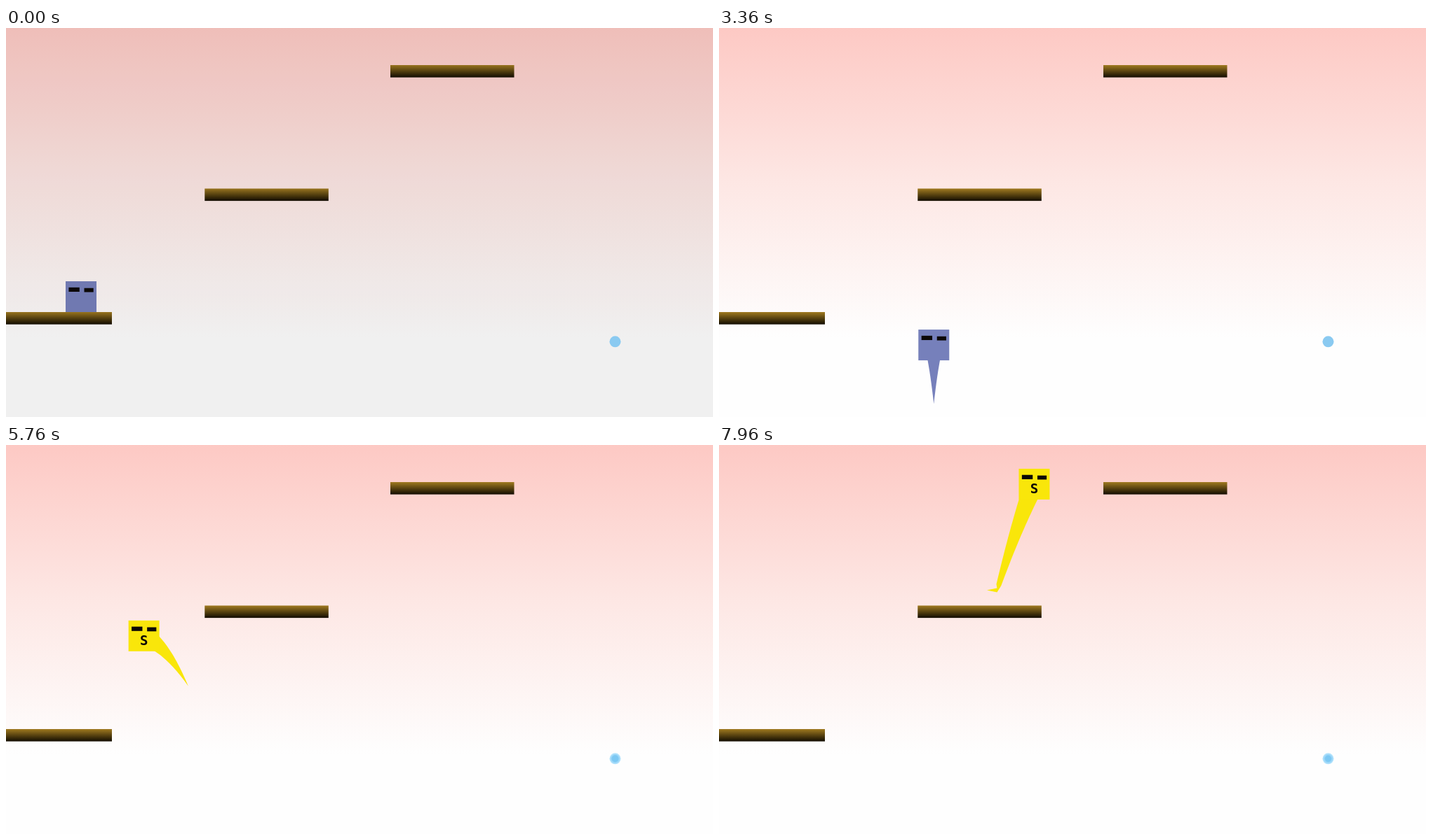
Animation, 1008 px wide and 556 px high, one loop 8 s. Source, as an HTML page with a canvas:

```html
<!DOCTYPE html>
<html lang="en">
<head>
<meta charset="utf-8">
<title>Box jumper</title>
<style>
html, body { margin: 0; width: 100%; height: 100%; overflow: hidden; background: #fff; }
canvas { display: block; width: 1008px; height: 556px; }
</style>
</head>
<body>
<canvas id="stage" width="1008" height="556"></canvas>
<script>
const ctx = document.getElementById('stage').getContext('2d');
const W = 1008, H = 556, LOOP = 8, SIZE = 44;
const BLUE = '#7680bb', YELLOW = '#f9e60a', RED = '#ff200c', INK = '#0c0806';

// seconds and pixels
const STEP = 0.002, GRAVITY = 1095, MAX_FALL = 550, GROUND = 591;
const LOW = 525, HIGH = 812;
const OPEN = 3.391, PICK = 3.7, CLOSE = 4.375, RESUME = 4.445, FADE = 0.16;
const TRAIL = 0.28, TRAIL_WIDTH = 28.4, TRAIL_STEPS = 28;

const platforms = [-25.5, 283.3, 548].map((x, i) => ({ x, y: 406 - 176.5 * i, w: 176.5, h: 17.6 }));

// key presses of the player
const runs = [
  { from: 0.56, to: 1.03, speed: 218 },
  { from: 2.27, to: 2.71, speed: 220 },
  { from: 5.275, to: 6.127, speed: -226 },
  { from: 6.373, to: 7.177, speed: 265 },
  { from: 7.452, to: LOOP, speed: 241 }
];
const jumps = [
  { at: 0.728, speed: LOW }, { at: 3.016, speed: LOW },
  { at: 5.114, speed: HIGH }, { at: 6.384, speed: HIGH }, { at: 7.742, speed: HIGH }
];

function landing(x, before, after) {
  const hit = platforms.find(p =>
    x + SIZE / 2 > p.x && x - SIZE / 2 < p.x + p.w && before <= p.y && after >= p.y);
  return hit ? hit.y : after >= GROUND ? GROUND : null;
}

// Plays the key presses once; the result holds the box centre at every step.
function simulate() {
  const path = [];
  let x = 107, feet = 406, vy = 0;
  for (let i = 0; i <= LOOP / STEP; i++) {
    const t = i * STEP;
    path.push([x, feet - SIZE / 2]);
    if (t >= OPEN && t < RESUME) {
      vy = 0;
      continue;
    }
    const run = runs.find(r => t >= r.from && t < r.to);
    if (run) x += run.speed * STEP;
    const jump = jumps.find(j => t >= j.at && t < j.at + STEP);
    if (jump) vy = -jump.speed;
    const next = Math.min(vy + GRAVITY * STEP, MAX_FALL);
    const after = feet + (vy + next) / 2 * STEP;
    const floor = next > 0 ? landing(x, feet, after) : null;
    feet = floor === null ? after : floor;
    vy = floor === null ? next : 0;
  }
  return path;
}

const path = simulate();

function centre(t) {
  const s = Math.min(Math.max(t / STEP, 0), path.length - 1.001);
  const i = Math.floor(s), f = s - i;
  return path[i].map((v, k) => v + (path[i + 1][k] - v) * f);
}

function dimAt(t) {
  if (t < OPEN) return 0.057 * Math.exp(-t / FADE);
  if (t < CLOSE) return 0.6 * (1 - Math.exp(-(t - OPEN) / FADE));
  return 0.6 * Math.exp(-(t - CLOSE) / FADE);
}

function rect(fill, x, y, w, h) {
  ctx.fillStyle = fill;
  ctx.fillRect(x, y, w, h);
}

function gradient(y0, y1, ...colors) {
  const g = ctx.createLinearGradient(0, y0, 0, y1);
  colors.forEach((c, i) => g.addColorStop(i / (colors.length - 1), c));
  return g;
}

function drawWorld() {
  rect(gradient(0, 443, '#fdc9c4', '#fde7e4', '#fefefe'), 0, 0, W, H);
  for (const { x, y, w, h } of platforms) {
    rect(gradient(y, y + h, '#a07a20', '#120c00'), x, y, w, h);
  }
}

function drawTrail(t, color) {
  const left = [], right = [];
  let nx = 1, ny = 0;
  for (let i = 0; i <= TRAIL_STEPS; i++) {
    const k = i / TRAIL_STEPS, at = t - k * TRAIL;
    const [x, y] = centre(at);
    const [px, py] = centre(at - TRAIL / TRAIL_STEPS);
    const d = Math.hypot(x - px, y - py);
    if (d > 0.05) {
      nx = (py - y) / d;
      ny = (x - px) / d;
    }
    const r = TRAIL_WIDTH / 2 * (1 - k);
    left.push([x + nx * r, y + ny * r]);
    right.unshift([x - nx * r, y - ny * r]);
  }
  ctx.beginPath();
  left.concat(right).forEach(([x, y]) => ctx.lineTo(x, y));
  ctx.fillStyle = color;
  ctx.fill();
}

function drawLetter(letter, size, y) {
  ctx.font = `bold ${size}px "DejaVu Sans Mono", monospace`;
  ctx.textAlign = 'center';
  ctx.fillText(letter, 22, y);
}

function drawBox(x, y, color) {
  ctx.save();
  ctx.translate(x, y);
  rect(color, 0, 0, SIZE, SIZE);
  rect(INK, 4.4, 8.8, 15.4, 6.2);
  rect(INK, 26.5, 9.7, 13.2, 5.8);
  if (color === YELLOW) drawLetter('S', 19, 35.5);
  if (color === RED) drawLetter('V', 22, 37.5);
  ctx.restore();
}

function drawMenu(t) {
  rect('rgba(0,0,0,.63)', 89, 0, 847.5, 445);
  const picked = t < PICK ? 0 : 1;
  [BLUE, YELLOW, RED].forEach((color, i) => {
    const x = Math.round(208.2 + i * 282.5);
    if (i === picked) rect('#fff', x - 22, 167, 88, 88);
    drawBox(x, 189, color);
  });
}

function disc(r, color) {
  ctx.beginPath();
  ctx.arc(868.5, 448.3, r, 0, 2 * Math.PI);
  ctx.fillStyle = color;
  ctx.fill();
}

function drawPointer(t) {
  if (t < CLOSE) {
    disc(8, t < OPEN ? '#8acaf1' : '#78cbf8');
    return;
  }
  disc(8, '#b4e3fc');
  disc(6.6, '#9ad6f8');
  disc(5.4 + 0.7 * Math.cos(2 * Math.PI * (t - 5.05) / 1.98), '#7cc8f3');
}

function draw(t) {
  const color = t < PICK ? BLUE : YELLOW;
  const [x, y] = centre(t);
  drawWorld();
  drawTrail(t, color);
  drawBox(x - SIZE / 2, y - SIZE / 2, color);
  rect(`rgba(0,0,0,${dimAt(t).toFixed(4)})`, 0, 0, W, H);
  if (t >= OPEN && t < CLOSE) drawMenu(t);
  drawPointer(t);
}

const begin = performance.now();
function tick() {
  draw((performance.now() - begin) / 1000 % LOOP);
  requestAnimationFrame(tick);
}
tick();
</script>
</body>
</html>
```
